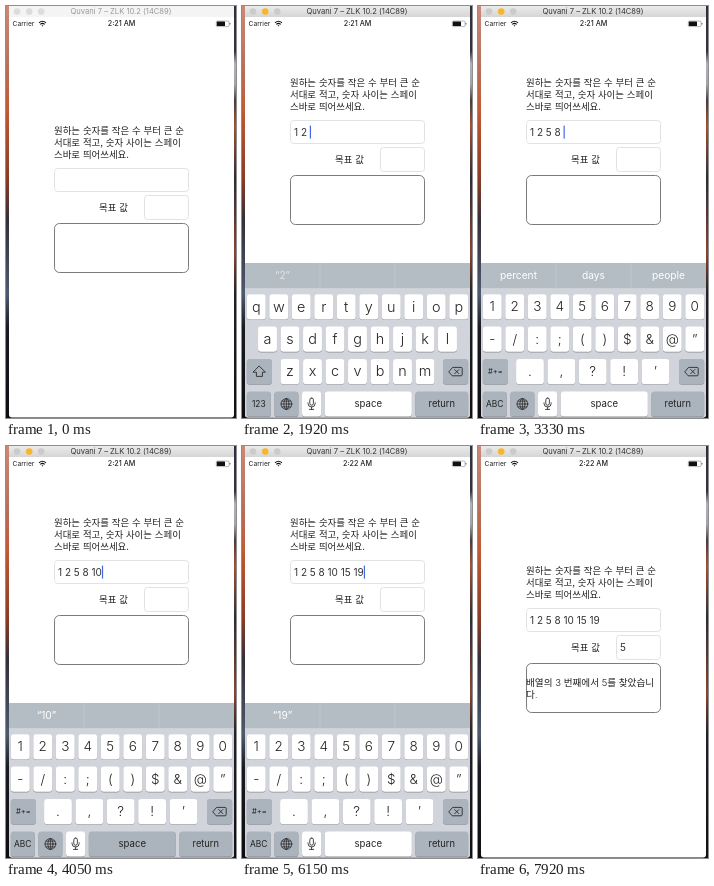
An HTML page for the animation above (8.73 s loop, 230 by 412 pixels).

```html
<!DOCTYPE html>
<html lang="ko">
<head>
<meta charset="utf-8">
<title>Array search</title>
<style>
html, body { margin: 0; width: 100%; height: 100%; overflow: hidden; background: #15161d; }
svg { display: block; width: 100%; height: 100%; }
text { font-family: Inter, Roboto, sans-serif; fill: #222; white-space: pre; }
.ko { font-family: "Noto Sans CJK KR", "Noto Sans CJK", "Noto Sans CJK JP", sans-serif; font-size: 9.45px; word-spacing: .2px; font-weight: 300; fill: #222; }
.mix { font-family: Inter, "Noto Sans CJK KR", "Noto Sans CJK", sans-serif; font-size: 9.6px; font-weight: 300; fill: #222; }
.value { font-size: 10px; fill: #333; }
.mid { text-anchor: middle; }
.field { fill: #fff; stroke: #e2e2e2; }
.caret { fill: #4268e6; }
.word { fill: #fff; font-size: 17px; text-anchor: middle; }
.char { font-weight: 300; }
.line { fill: none; stroke: #222; stroke-width: 1.4; stroke-linejoin: round; stroke-linecap: round; }
</style>
</head>
<body>
<svg viewBox="0 0 230 412" preserveAspectRatio="none">
  <defs>
    <linearGradient id="wallLeft" x1="0" y1="0" x2="0" y2="1">
      <stop offset="0" stop-color="#c98a78"/>
      <stop offset=".15" stop-color="#b5705c"/>
      <stop offset=".25" stop-color="#c25a35"/>
      <stop offset=".42" stop-color="#8a3b25"/>
      <stop offset=".52" stop-color="#33303a"/>
      <stop offset=".7" stop-color="#4d5a6e"/>
      <stop offset=".78" stop-color="#1a1b22"/>
      <stop offset="1" stop-color="#0d0d11"/>
    </linearGradient>
    <linearGradient id="wallRight" x1="0" y1="0" x2="0" y2="1">
      <stop offset="0" stop-color="#2c3040"/>
      <stop offset=".11" stop-color="#33343f"/>
      <stop offset=".14" stop-color="#b0b3bb"/>
      <stop offset=".19" stop-color="#a4a4ab"/>
      <stop offset=".23" stop-color="#4a3a3a"/>
      <stop offset=".29" stop-color="#a8502f"/>
      <stop offset=".42" stop-color="#2c2c36"/>
      <stop offset=".6" stop-color="#8a442c"/>
      <stop offset=".7" stop-color="#20212a"/>
      <stop offset="1" stop-color="#101014"/>
    </linearGradient>
    <linearGradient id="bar" x1="0" y1="0" x2="0" y2="1">
      <stop offset="0" stop-color="#ebebeb"/>
      <stop offset="1" stop-color="#d5d5d5"/>
    </linearGradient>
    <clipPath id="screen"><path d="M3 11H228V408.4a3 3 0 0 1-3 3H6a3 3 0 0 1-3-3Z"/></clipPath>
  </defs>

  <rect width="115" height="412" fill="url(#wallLeft)"/>
  <rect x="115" width="115" height="412" fill="url(#wallRight)"/>

  <rect id="titleBar" x="3" width="225" height="11.2" fill="url(#bar)"/>
  <g id="lights">
    <circle cx="11" cy="5.6" r="3.3"/>
    <circle id="yellow" cx="23.2" cy="5.6" r="3.3"/>
    <circle cx="35.2" cy="5.6" r="3.3"/>
  </g>
  <text id="title" class="mid" x="115" y="8.4" font-size="7.6">Quvani 7 – ZLK 10.2 (14C89)</text>

  <g clip-path="url(#screen)">
    <rect x="3" y="11" width="225" height="401" fill="#fff"/>
    <text x="6.5" y="20.4" font-size="6.7">Carrier</text>
    <g fill="none" stroke="#111" stroke-width="1.1">
      <path d="M33 16.8q3.5-3 7 0M34.3 18.3q2.2-1.9 4.4 0"/>
      <circle cx="36.5" cy="19.7" r=".45" fill="#111" stroke-width=".5"/>
    </g>
    <text id="clock" class="mid" x="115.5" y="20.4" font-size="7.2" font-weight="500"></text>
    <rect x="210.3" y="15" width="12.8" height="5.6" rx="1" fill="#fff" stroke="#777" stroke-width=".5"/>
    <rect x="210.8" y="15.5" width="8.2" height="4.6" rx=".4" fill="#111"/>
    <rect x="223.5" y="16.8" width=".8" height="2" rx=".4" fill="#777"/>

    <g id="page">
      <text class="ko" x="48" y="127.6">원하는 숫자를 작은 수 부터 큰 순</text>
      <text class="ko" x="48" y="139.8">서대로 적고, 숫자 사이는 스페이</text>
      <text class="ko" x="48" y="152">스바로 띄어쓰세요.</text>
      <rect class="field" x="48.5" y="162.5" width="134" height="23" rx="3"/>
      <text id="a" class="value" x="52" y="177.9"></text>
      <text class="ko" x="93" y="204.7">목표 값</text>
      <rect class="field" x="138.5" y="189.5" width="44" height="24" rx="3"/>
      <text id="b" class="value" x="142" y="205.1"></text>
      <rect x="48.5" y="217.5" width="134" height="49" rx="5" fill="#fff" stroke="#6c6c6c" stroke-width=".9"/>
      <g id="result">
        <text class="mix" x="48" y="239.7">배열의 3 번째에서 5를 찾았습니</text>
        <text class="mix" x="48" y="251.9">다.</text>
      </g>
      <rect id="caret" class="caret" width="1.2" height="13"/>
    </g>

    <g id="keyboard"></g>
  </g>
</svg>

<script>
const LOOP = 8730;
const GRAY = '#abb3bd';
const START = ['I', 'The', 'I’m'];
const NEXT = ['percent', 'days', 'people'];
const $ = id => document.getElementById(id);

// ---- Keyboard, in points (375 wide), drawn at 0.6 ----
const ROWS = [52, 106, 160, 214];

const key = (x, row, w, fill = '#fff', id = '') =>
  `<rect x="${x}" y="${ROWS[row] + 1}" width="${w}" height="42" rx="5" fill="#8a8d92"/>` +
  `<rect ${id && `id="${id}"`} x="${x}" y="${ROWS[row]}" width="${w}" height="42" rx="5" fill="${fill}"/>`;

const label = (x, row, str, size, id = '', style = '') =>
  `<text ${id && `id="${id}"`} class="mid ${style}" x="${x}" y="${ROWS[row] + 20.5 + size * .36}" font-size="${size}">${str}</text>`;

const keyRow = (chars, row, x, step, size) => [...chars].map((c, i) => {
  const left = x + i * step;
  const w = step - 6;
  return key(left, row, w) + label(left + w / 2, row, c.replace('&', '&amp;'), size, '', 'char');
}).join('');

function letters(id, upper) {
  const size = upper ? 22.5 : 24;
  const rows = ['qwertyuiop', 'asdfghjkl', 'zxcvbnm'];
  const starts = [3, 21.75, 59.25];
  const keys = rows.map((r, i) =>
    keyRow(upper ? r.toUpperCase() : r, i, starts[i], 37.5, size)).join('');
  const arrow = `<path class="line" ${upper ? 'style="fill:#111"' : ''}
    transform="translate(24 181)" d="M0-9L10 1H5V8H-5V1H-10Z"/>`;
  return `<g id="${id}">${keys}${key(3, 2, 42, upper ? '#fff' : GRAY)}${arrow}</g>`;
}

const numbers = `<g id="num">
  ${keyRow('1234567890', 0, 3, 37.5, 22.5)}
  ${keyRow('-/:;()$&@”', 1, 3, 37.5, 22.5)}
  ${keyRow('.,?!’', 2, 58.5, 52.3, 22.5)}
  ${key(3, 2, 42, GRAY)}${label(24, 2, '#+=', 12.5)}</g>`;

const common = `
  ${key(330, 2, 42, GRAY)}
  <path class="line" transform="translate(351 181)" d="M-11 0l6-7H9q2 0 2 2V5q0 2-2 2H-5zM-1.5-3.5l7 7m0-7l-7 7"/>
  ${key(3, 3, 40, GRAY, 'modeKey')}${label(23, 3, '', 14, 'mode')}
  ${key(49, 3, 40, GRAY)}
  <g class="line" style="stroke-width:1.2" transform="translate(69 235)">
    <circle r="9"/><ellipse rx="4.2" ry="9"/>
    <path d="M0-9V9M-9 0H9M-7.5-4.8H7.5M-7.5 4.8H7.5"/>
  </g>
  ${key(95, 3, 32)}
  <g class="line" transform="translate(111 235)">
    <rect x="-3" y="-10" width="6" height="12" rx="3"/>
    <path d="M-6-2v1a6 6 0 0 0 12 0v-1M0 5v4M-3.5 9h7"/>
  </g>
  ${key(133, 3, 145, '#fff', 'space')}${label(205.5, 3, 'space', 16)}
  ${key(284, 3, 88, GRAY)}${label(328, 3, 'return', 15.5)}`;

const words = id => `<g id="${id}">` +
  [62.5, 187.5, 312.5].map(x => `<text class="word" x="${x}" y="26"></text>`).join('') + '</g>';

$('keyboard').innerHTML = `
  <rect width="375" height="262" fill="#d1d5db"/>
  <rect width="375" height="42" fill="#b5bdc4"/>
  <path d="M125 0V42M250 0V42" stroke="#c8ced4"/>
  ${words('oldWords')}${words('newWords')}
  ${letters('upper', true)}${letters('lower', false)}${numbers}${common}`;

// ---- Script of taps ----
const events = [];
const at = (time, change) => events.push({ time, change });

function typeNumber(field, before, modeAt, taps, spaceAt) {
  at(modeAt, { press: 'modeKey' });
  at(modeAt + 50, { press: '', kb: 'num' });
  let num = '';
  for (const [time, digit] of taps) {
    num += digit;
    at(time, { [field]: before + num, words: [`“${num}”`] });
  }
  if (spaceAt) {
    at(spaceAt, { press: 'space' });
    at(spaceAt + 65, { press: '', [field]: before + num + ' ', kb: 'lower', words: NEXT });
  }
}

at(0, { a: '', b: '', kb: 'upper', words: START, focus: '', press: '' });
at(150, { focus: 'a' });
typeNumber('a', '', 1080, [[1290, 1]], 1410);
typeNumber('a', '1 ', 1590, [[1710, 2]], 1810);
typeNumber('a', '1 2 ', 2280, [[2400, 5]], 2490);
typeNumber('a', '1 2 5 ', 2700, [[2880, 8]], 3030);
typeNumber('a', '1 2 5 8 ', 3270, [[3480, 1], [3720, 0]], 4020);
typeNumber('a', '1 2 5 8 10 ', 4350, [[4590, 1], [4830, 5]], 5070);
typeNumber('a', '1 2 5 8 10 15 ', 5340, [[5580, 1], [5820, 9]]);
at(6510, { focus: 'b', kb: 'upper', words: START });
typeNumber('b', '', 6900, [[7260, 5]]);
at(7650, { focus: '' });

function stateAt(t) {
  const s = { wordsAt: -999, oldWords: [] };
  for (const { time, change } of events) {
    if (time > t) break;
    if (change.words && time) {
      s.oldWords = s.words;
      s.wordsAt = time;
    }
    Object.assign(s, change);
  }
  return s;
}

// ---- Drawing ----
const clamp = v => Math.min(1, Math.max(0, v));
const ease = (t, from, to) => {
  const p = clamp((t - from) / (to - from));
  return p * p * (3 - 2 * p);
};
const show = (id, on) => $(id).style.display = on ? '' : 'none';

function setWords(id, list, opacity) {
  [...$(id).children].forEach((el, i) => el.textContent = list[i] || '');
  $(id).style.opacity = opacity;
}

function draw(t) {
  const s = stateAt(t);
  const active = t >= 30;
  $('titleBar').setAttribute('fill', active ? 'url(#bar)' : '#f4f4f4');
  $('lights').setAttribute('fill', active ? '#cbcbcb' : '#dcdcdc');
  $('yellow').style.fill = active ? '#f9b52c' : '';
  $('title').style.fill = active ? '#333' : '#999';
  $('clock').textContent = t < 5400 ? '2:21 AM' : '2:22 AM';

  const up = ease(t, 150, 560) - ease(t, 7650, 7910);
  $('page').setAttribute('transform', `translate(0 ${-48 * up})`);
  $('keyboard').setAttribute('transform', `translate(3 ${257 + 156 * (1 - up)}) scale(.6)`);

  for (const id of ['a', 'b']) $(id).textContent = s[id];
  show('caret', s.focus);
  if (s.focus) {
    const el = $(s.focus);
    const width = s[s.focus] ? el.getComputedTextLength() : 0;
    $('caret').setAttribute('x', +el.getAttribute('x') + width);
    $('caret').setAttribute('y', el.getAttribute('y') - 10.3);
  }

  for (const kb of ['upper', 'lower', 'num']) show(kb, s.kb === kb);
  $('mode').textContent = s.kb === 'num' ? 'ABC' : '123';
  $('modeKey').setAttribute('fill', s.press === 'modeKey' ? '#fff' : GRAY);
  $('space').setAttribute('fill', s.press === 'space' ? GRAY : '#fff');

  const age = t - s.wordsAt;
  setWords('oldWords', s.oldWords, 1 - clamp(age / 110));
  setWords('newWords', s.words, clamp((age - 50) / 130));
  show('result', t >= 7680);
}

const begin = performance.now();
function tick() {
  draw((performance.now() - begin) % LOOP);
  requestAnimationFrame(tick);
}
tick();
</script>
</body>
</html>
```
